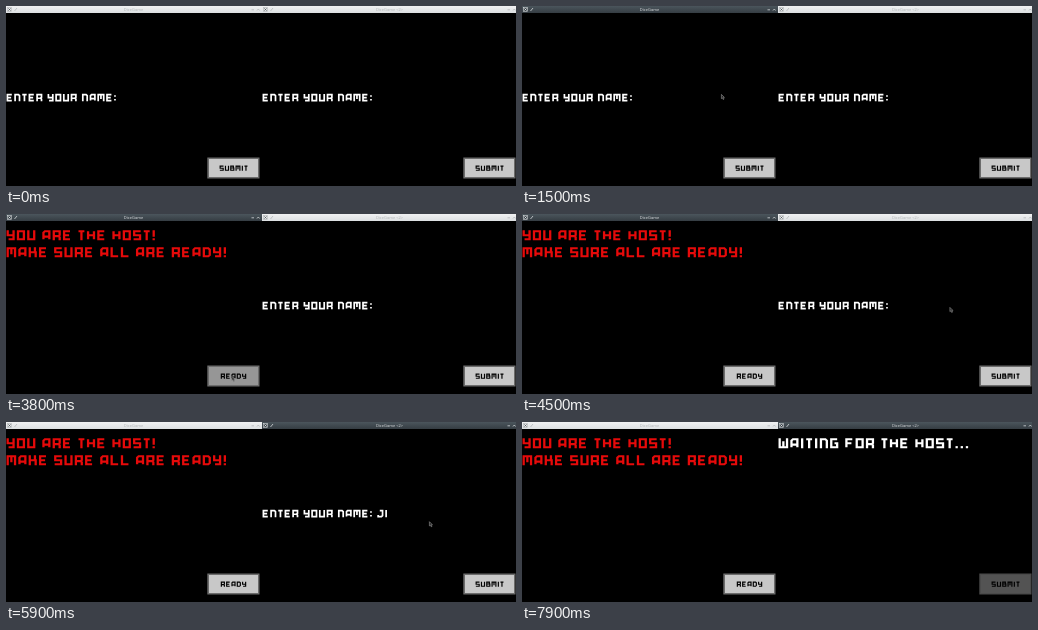
An HTML page with a canvas for the animation above (8000 ms loop, 510 by 180 pixels).

```html
<!DOCTYPE html>
<html lang="en">
<head>
<meta charset="utf-8">
<title>Lobby</title>
<style>
html, body { margin: 0; width: 510px; height: 180px; overflow: hidden; background: #000; }
canvas { display: block; }
</style>
</head>
<body>
<canvas id="stage" width="510" height="180"></canvas>
<script>
const ctx = document.getElementById('stage').getContext('2d');
const LOOP = 8000;

// Square stroke font: [width, path] on a grid four units wide and six high.
const FONT = {
  A: [4, 'M0 6V1L1 0H4V6M0 4H4'],
  B: [4, 'M0 0H3.4V2.8H0ZM0 2.8H4V6H0Z'],
  D: [4, 'M0 0H3L4 1V5L3 6H0Z'],
  E: [4, 'M4 0H0V6H4M0 3H3.4'],
  F: [4, 'M4 0H0V6M0 3H3.4'],
  G: [4, 'M4 0H0V6H4V3H2.2'],
  H: [4, 'M0 0V6M4 0V6M0 3H4'],
  I: [.5, 'M.25 -.7V6.7'],
  J: [4, 'M1.5 0H4V5L3 6H0V4.4'],
  K: [4, 'M0 -.7V6.7M3.5 -.7V3M0 3H4V6.7'],
  L: [4, 'M0 -.7V6H4.4'],
  M: [5, 'M0 6.7V0H5V6.7M2.5 0V4.5'],
  N: [4, 'M0 6.7V0H3L4 1V6.7'],
  O: [4, 'M0 0H4V6H0Z'],
  R: [4, 'M0 6.7V0H4V2.8L3 3.6H0M3 3.6L4 4.5V6.7'],
  S: [4, 'M4.4 0H0V3H4V6H-.4'],
  T: [3, 'M-.5 0H3.5M1.5 0V6.7'],
  U: [4, 'M0 -.7V6H4V-.7'],
  V: [4, 'M0 -.7V4L2 6L4 4V-.7'],
  W: [5, 'M0 -.7V6H5V-.7M2.5 1.5V6'],
  Y: [4, 'M0 -.7V3H4M4 -.7V6H.6'],
  ':': [.5, 'M.25 .6V2.1M.25 4.5V6'],
  '!': [.5, 'M.25 -.7V4M.25 5.2V6.7'],
  '.': [.5, 'M.25 5.1V6.7']
};
for (const ch in FONT) FONT[ch][1] = new Path2D(FONT[ch][1]);

const ARROW = new Path2D('M.4 .4V4.6L1.4 3.8L2.2 5.5L3 5.1L2.3 3.4H3.4Z');

// Cursor positions: [time, x, y]
const CURSOR = [
  [300, 184, 62], [800, 246, 133], [1000, 247, 134], [1200, 257, 160],
  [1500, 199, 88], [1700, 199, 89], [2900, 199, 89], [3300, 257, 174],
  [3600, 226, 162], [4000, 225, 162], [4500, 427.5, 93], [4900, 427.5, 93],
  [5700, 423, 99], [6400, 423, 100], [6600, 421, 88], [6800, 380, 48],
  [7000, 454, 140], [7400, 485, 161], [7600, 485, 161]
];

function write(text, x, y, size, color) {
  ctx.save();
  ctx.translate(x, y);
  ctx.scale(size, size);
  ctx.translate(.8, .8);
  ctx.strokeStyle = color;
  ctx.lineWidth = 1.55;
  for (const ch of text) {
    if (ch === ' ') { ctx.translate(3.6, 0); continue; }
    const [width, path] = FONT[ch];
    ctx.save();
    ctx.scale(1.1, 1);
    ctx.stroke(path);
    ctx.restore();
    ctx.translate(width * 1.1 + 3.3, 0);
  }
  ctx.restore();
}

function line(color, ...points) {
  ctx.strokeStyle = color;
  ctx.lineWidth = .8;
  ctx.beginPath();
  points.forEach(([x, y]) => ctx.lineTo(x, y));
  ctx.stroke();
}

function titleBar(x, width, title, active) {
  const shade = ctx.createLinearGradient(0, 0, 0, 7);
  shade.addColorStop(0, active ? '#4b555c' : '#f0f1f2');
  shade.addColorStop(1, active ? '#353d43' : '#dcdfe1');
  ctx.fillStyle = shade;
  ctx.fillRect(x, 0, width, 7);
  const ink = active ? '#d5d9db' : '#b4b8ba';
  const mark = active ? '#e6e8e9' : '#50565a';
  ctx.strokeStyle = ink;
  ctx.lineWidth = .6;
  ctx.strokeRect(x + 1.5, 1.5, 4, 4);
  line(mark, [x + 2.4, 2.4], [x + 4.6, 4.6]);
  line(mark, [x + 4.6, 2.4], [x + 2.4, 4.6]);
  line(ink, [x + 8.5, 5], [x + 11, 2]);
  line(ink, [x + 245.5, 3.8], [x + 248, 3.8]);
  line(ink, [x + 251, 4.5], [x + 252.3, 3], [x + 253.6, 4.5]);
  ctx.fillStyle = ink;
  ctx.font = '4px "Noto Sans", sans-serif';
  ctx.textAlign = 'center';
  ctx.fillText(title, x + 127.5, 5);
}

function button(x, label, state) {
  const [edge, face] = {
    normal: ['#6c6c6c', '#c8c8c8'],
    hover: ['#6c6c6c', '#969696'],
    disabled: ['#4b4b4b', '#535353']
  }[state];
  ctx.fillStyle = edge;
  ctx.fillRect(x + 201.3, 151.5, 52.2, 21);
  ctx.fillStyle = face;
  ctx.fillRect(x + 203, 153, 49, 18);
  write(label, x + (label === 'READY' ? 214.8 : 213.6), 159.6, .69, '#000');
}

function cursorAt(t) {
  const next = CURSOR.findIndex(key => key[0] > t);
  if (next < 1) return null;
  const [t0, x0, y0] = CURSOR[next - 1], [t1, x1, y1] = CURSOR[next];
  const k = (t - t0) / (t1 - t0);
  return [x0 + (x1 - x0) * k, y0 + (y1 - y0) * k];
}

function drawCursor([x, y]) {
  ctx.save();
  ctx.translate(x, y);
  ctx.fillStyle = '#222';
  ctx.strokeStyle = '#8c8c8c';
  ctx.lineWidth = .65;
  ctx.fill(ARROW);
  ctx.stroke(ARROW);
  ctx.restore();
}

const typed = (name, times, t) => name.slice(0, times.filter(key => t >= key).length);
const prompt = (x, name) => write('ENTER YOUR NAME: ' + name, x + .6, 87.8, 1, '#fff');
const heading = (text, x, y, color) => write(text, x + .6, y, 1.34, color);
const waiting = x => heading('WAITING FOR THE HOST...', x, 16.2, '#fff');

function draw(t) {
  const cursor = cursorAt(t);
  const pointed = x => cursor && cursor[0] > x + 201 && cursor[0] < x + 254 &&
    cursor[1] > 151 && cursor[1] < 173 ? 'hover' : 'normal';
  ctx.fillStyle = '#000';
  ctx.fillRect(0, 0, 510, 180);
  titleBar(0, 256, 'DiceGame', t >= 1300 && t < 4800);
  titleBar(256, 254, 'DiceGame <2>', t >= 4800);

  if (t < 3700) prompt(0, typed('JOVA', [1900, 2100, 2300, 2500], t));
  else if (t < 3800) waiting(0);
  else {
    heading('YOU ARE THE HOST!', 0, 16.2, '#e60a0a');
    heading('MAKE SURE ALL ARE READY!', 0, 33.2, '#e60a0a');
  }
  button(0, t < 3700 ? 'SUBMIT' : 'READY', pointed(0));

  const joined = t >= 7600;
  if (joined) waiting(256);
  else prompt(256, typed('JITO', [5400, 5800, 6100, 6400], t));
  button(256, 'SUBMIT', joined ? 'disabled' : pointed(256));

  if (cursor) drawCursor(cursor);
}

function tick() {
  draw(performance.now() % LOOP);
  requestAnimationFrame(tick);
}
tick();
</script>
</body>
</html>
```
